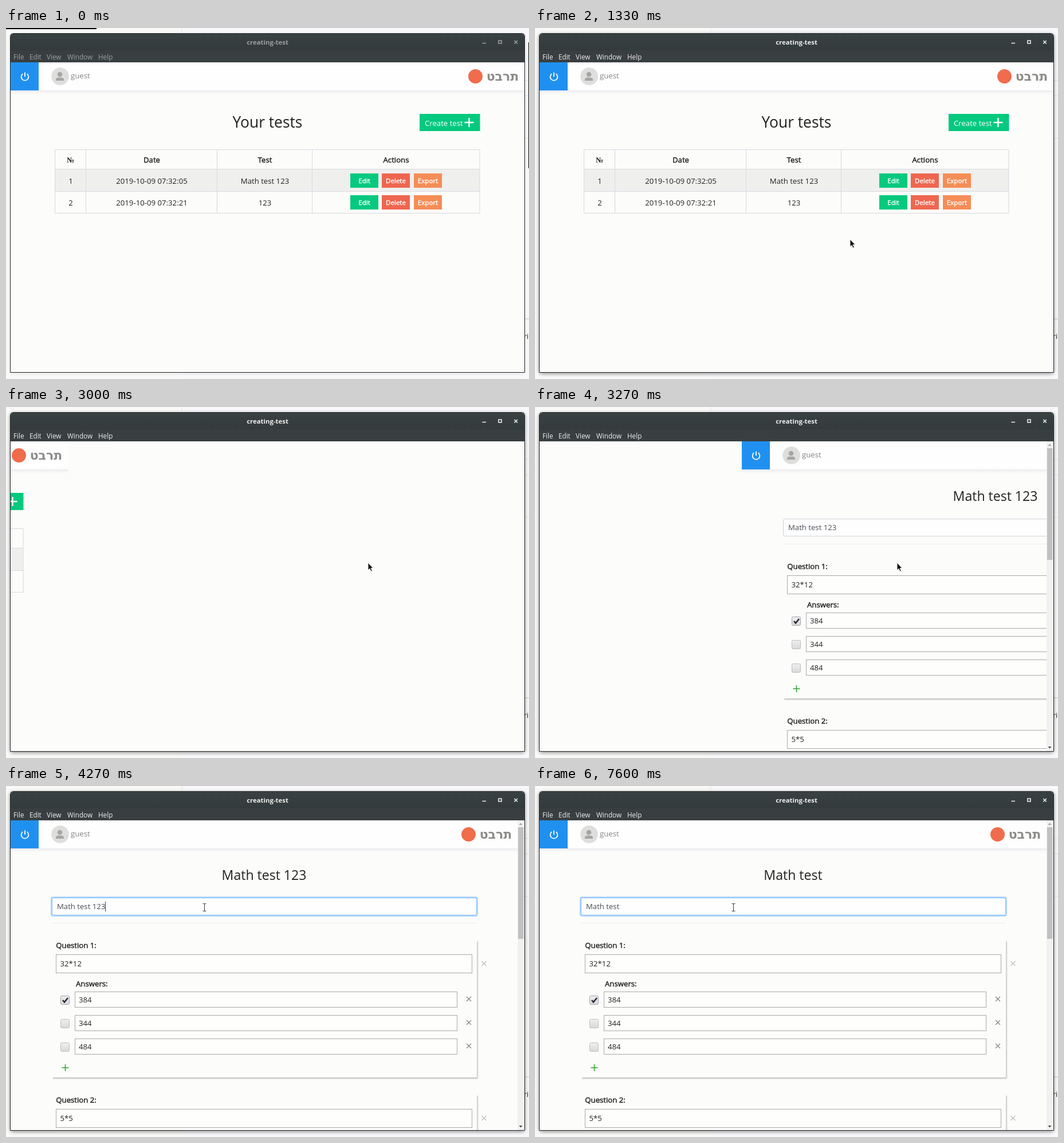
Write an HTML page that moves like this. It is 913 by 613 pixels and loops after 8 s.

```html
<!DOCTYPE html>
<html lang="en">
<head>
<meta charset="utf-8">
<title>creating-test</title>
<style>
  html, body { margin: 0; width: 100%; height: 100%; overflow: hidden; background: #f8f8fa; }
  svg { display: block; font: 13.2px "Open Sans", "Noto Sans", sans-serif; }
  text { fill: #222; white-space: pre; }
  .mid { text-anchor: middle; }
  .bold { stroke: #222; stroke-width: .45px; }
  .white, .button text { fill: #fff; }
  .button text { font-size: 11.55px; stroke: #fff; stroke-width: .4px; text-anchor: middle; }
  .chrome text { fill: #eee; font-size: 11.7px; }
  .chrome .title { font-size: 11.4px; font-weight: bold; text-anchor: middle; }
  .line { fill: none; stroke: #d9d9e2; }
  .field { fill: #fefefd; stroke: #a9a9a9; }
</style>
</head>
<body>
<svg width="913" height="613" viewBox="0 0 913 613">
  <defs>
    <linearGradient id="bar" x2="0" y2="1"><stop stop-color="#3a4142"/><stop offset="1" stop-color="#2f3637"/></linearGradient>
    <linearGradient id="box" x2="0" y2="1"><stop stop-color="#efefef"/><stop offset="1" stop-color="#d9d9d9"/></linearGradient>
    <linearGradient id="fade" x2="0" y2="1"><stop stop-color="#e9e9ee"/><stop offset="1" stop-color="#fcfcfa" stop-opacity="0"/></linearGradient>
    <filter id="blur" x="-5%" y="-5%" width="110%" height="110%"><feGaussianBlur stdDeviation="3"/></filter>
    <filter id="soft" x="-5%" y="-5%" width="110%" height="110%"><feGaussianBlur stdDeviation="1.3"/></filter>
    <clipPath id="view"><rect id="viewRect" x="8" y="60" width="897" height="541"/></clipPath>
    <clipPath id="avatar"><circle cx="94.5" cy="84.5" r="15.5"/></clipPath>
    <path id="cross" d="M-4-4 4 4M4-4-4 4"/>
    <g id="header">
      <rect x="8" y="60" width="897" height="49" fill="#fefefe"/>
      <rect x="8" y="109" width="897" height="9" fill="url(#fade)"/>
      <rect x="8" y="60" width="49" height="49" fill="#2090f0"/>
      <path d="M29.3 80a6.4 6.4 0 1 0 7.4 0M33 77.5V85" fill="none" stroke="#fff" stroke-width="1.8"/>
      <g clip-path="url(#avatar)">
        <circle cx="94.5" cy="84.5" r="15.5" fill="#dededc"/>
        <path d="M87 92v-2q0-3 4-3.5h6q4 .5 4 3.5v2z" fill="#a6a6a4"/>
        <circle cx="94" cy="81" r="4.3" fill="#a6a6a4"/>
      </g>
      <text x="113" y="88" style="fill:#858585">guest</text>
    </g>
    <g id="brand">
      <circle cx="819.5" cy="84.5" r="12.5" fill="#ef6c4c"/>
      <text class="mid" x="867" y="91.5" style="fill:#8b8b89;font:bold 22px 'DejaVu Sans',sans-serif">תרבט</text>
    </g>
  </defs>

  <rect width="306" height="613" fill="#f9f9f8"/>
  <path d="M306.5 0V10" stroke="#e6e6ea"/>
  <path d="M906 91.5h7M906 118.5h7M906 192.5h7" stroke="#e4e4e8"/>
  <path d="M906 508h7" stroke="#dcdce0" stroke-width="2"/>
  <path id="otherWindow" d="M0 0H158V2H0zM912 25h1V245h-1z"/>
  <rect id="shadow" x="7" y="11" width="899" height="593" rx="5" filter="url(#blur)"/>
  <text x="904" y="543" style="font-size:12.5px">rid</text>

  <path d="M7.5 601.5V15q0-5.5 5.5-5.5H900q5.5 0 5.5 5.5V601.5z" fill="#fcfcfa" stroke="#222727"/>
  <path d="M8 60V15q0-5 5-5H900q5 0 5 5V60z" fill="url(#bar)"/>
  <rect x="8" y="39" width="897" height="21" fill="#393f41"/>
  <g id="chrome" class="chrome">
    <text class="title" x="456.5" y="28.5">creating-test</text>
    <text x="13" y="54.5">File</text><text x="41" y="54.5">Edit</text><text x="71" y="54.5">View</text>
    <text x="107" y="54.5">Window</text><text x="161" y="54.5">Help</text>
    <path d="M831.5 26.5h6.5M860 22h5v5h-5zM887.3 22l5.5 5.5M892.8 22l-5.5 5.5" fill="none" stroke="#eee" stroke-width="1.6"/>
  </g>

  <g clip-path="url(#view)">
    <g id="listPage">
      <use href="#header"/><use href="#brand"/>
      <text class="mid" x="456.5" y="174" style="font-size:26.4px">Your tests</text>
      <rect x="722" y="150" width="105.5" height="30" fill="#04c97e"/>
      <text class="white" x="731" y="171">Create test</text>
      <path d="M800.5 165h16M808.5 157v16" stroke="#fff" stroke-width="2.4"/>
      <rect x="86" y="247" width="741" height="39" fill="#efefed"/>
      <path class="line" d="M85.5 212.5H827V323.5H85.5zM139.5 213V323M368.5 213V323M534.5 213V323M86 246.5H827M86 285.5H827"/>
      <text class="mid" x="113" y="234.5" style="font:bold 13.2px 'Liberation Serif',serif">№</text>
      <text class="mid bold" x="254.5" y="234.5">Date</text>
      <text class="mid bold" x="452" y="234.5">Test</text>
      <text class="mid bold" x="681" y="234.5">Actions</text>
      <g id="rows"></g>
    </g>
    <g id="editPage">
      <use href="#header"/><use href="#brand" x="-12"/>
      <text id="heading" class="mid" x="450.5" y="164" style="font-size:23.1px"></text>
      <rect id="glow" x="78" y="193" width="746" height="35" rx="4.5" fill="#b0d6fd"/>
      <rect id="nameField" x="80.5" y="195.5" width="741" height="30" rx="3" fill="#fefefe"/>
      <text id="name" x="88.9" y="215" style="fill:#495057"></text>
      <path id="caret" d="M0 202v17" stroke="#333"/>
      <path d="M80 239.5H822" stroke="#ececea"/>
      <g id="questions"></g>
    </g>
  </g>
  <g id="scrollbar">
    <rect x="893" y="60" width="12" height="541" fill="#f1f1f0"/>
    <rect x="894" y="72" width="9.5" height="195" fill="#c1c1c1"/>
    <path d="M895.5 68h6l-3-3.5z" fill="#a3a3a3"/><path d="M895.5 593h6l-3 3.5z" fill="#505050"/>
  </g>

  <g id="cursor" stroke="#fff" stroke-linejoin="round" fill="#111">
    <path id="arrow" d="M0 0V13l3-2.6 2.2 4.8 2.2-1-2.2-4.6H9z" stroke-width=".9"/>
    <path id="hand" d="M-1 0q1.3-1 2 .5l1 4 6 .8q1.7.5 1.5 2.5l-.8 5H.8L-3 8.5q-.3-1.6 1.3-1.2L0 8z" stroke-width=".9"/>
    <path id="beam" d="M-3-6.5h2.2l.8.7.8-.7H3M0-6V6M-3 6.5h2.2l.8-.7.8.7H3" fill="none" stroke="#444" stroke-width="1.1"/>
  </g>
</svg>
<script>
const LOOP = 8000, FPS = 15;
const $ = id => document.getElementById(id);
const set = (id, attrs) => { for (const key in attrs) $(id).setAttribute(key, attrs[key]); };
const show = (id, on) => { $(id).style.display = on ? '' : 'none'; };

const button = (x, y, label, color, id = '') => `<g class="button">
  <rect ${id} x="${x}" y="${y}" width="49" height="25" fill="${color}"/>
  <text x="${x + 24.5}" y="${y + 17}">${label}</text></g>`;

const row = (number, date, test, y) => `
  <text class="mid" x="113" y="${y}">${number}</text>
  <text class="mid" x="254.5" y="${y}">${date}</text>
  <text class="mid" x="452" y="${y}">${test}</text>
  ${button(601, y - 17.5, 'Edit', '#04c97e', `id="edit${number}"`)}
  ${button(656, y - 17.5, 'Delete', '#ef6650')}
  ${button(712, y - 17.5, 'Export', '#f58d57')}`;

const cross = (x, y, color, width) =>
  `<use href="#cross" x="${x}" y="${y}" stroke="${color}" stroke-width="${width}"/>`;

const answer = (value, checked, y) => `
  <rect x="95.5" y="${y + 7}" width="15" height="15" rx="2" fill="url(#box)" stroke="${checked ? '#a3a3ad' : '#bebebe'}"/>
  ${checked ? `<path d="M99 ${y + 14.5}l3 3.5 6-7.5" fill="none" stroke="#2b2838" stroke-width="2.6"/>` : ''}
  <rect class="field" x="120.5" y="${y}" width="667" height="27"/>
  <text x="127" y="${y + 18.5}">${value}</text>
  ${cross(808, y + 12.5, '#858585', 1.3)}`;

const question = (number, text, answers, y) => `
  <rect x="82" y="${y + 6}" width="741.5" height="240" fill="#bbb" filter="url(#soft)"/>
  <rect x="79" y="${y - 4}" width="743" height="248" fill="#fcfcfa"/>
  <text class="bold" x="87.3" y="${y + 18}">Question ${number}:</text>
  <rect class="field" x="87.5" y="${y + 29.5}" width="726" height="32"/>
  <text x="94.5" y="${y + 50}">${text}</text>
  ${cross(834.5, y + 45, '#bcbcc0', 1.2)}
  <text class="bold" x="122" y="${y + 84.5}">Answers:</text>
  ${answers.map((value, i) => answer(value, i === 0, y + 94.5 + 41 * i)).join('')}
  <path d="M97.5 ${y + 227}h12M103.5 ${y + 221}v12" stroke="#28a428" stroke-width="1.5"/>`;

$('rows').innerHTML = row(1, '2019-10-09 07:32:05', 'Math test 123', 271.5)
  + row(2, '2019-10-09 07:32:21', '123', 309.5);
$('questions').innerHTML = question(1, '32*12', [384, 344, 484], 265)
  + question(2, '5*5', [], 535);

const progress = (t, from, to) => Math.min(1, Math.max(0, (t - from) / (to - from)));
const easeOut = u => 1 - (1 - u) ** 2;
const smooth = u => u * u * (3 - 2 * u);

// Pointer path: time, x, y
const path = [
  [870, 760, 613], [1330, 550, 369], [1670, 538, 330], [2400, 632, 272],
  [3330, 632, 272], [3600, 405, 229], [4000, 346.5, 212]
];

function pointer(t) {
  const i = path.findIndex(point => point[0] > t);
  if (i < 0) return path[path.length - 1].slice(1);
  if (i === 0) return [-50, -50];
  const [t0, x0, y0] = path[i - 1], [t1, x1, y1] = path[i];
  const u = smooth(progress(t, t0, t1));
  return [x0 + (x1 - x0) * u, y0 + (y1 - y0) * u];
}

const typedName = t => t < 5070 ? 'Math test 123' : t < 5200 ? 'Math test 12'
  : t < 5730 ? 'Math test 1' : 'Math test ';

const caretSpans = [[4070, 4600], [5070, 5600], [5730, 6070], [6600, 7130]];

function draw(t) {
  const active = progress(t, 130, 330);
  set('chrome', { opacity: .55 + .45 * active });
  set('shadow', { opacity: .08 + .34 * active });
  set('otherWindow', { opacity: 1 - active });

  const editing = t >= 3100;
  show('listPage', !editing);
  show('editPage', editing);
  show('scrollbar', editing);
  set('viewRect', { width: editing ? 885 : 897 });
  const leave = Math.round(-897 * easeOut(progress(t, 2800, 3100)));
  const enter = Math.round(885 * (1 - easeOut(progress(t, 3100, 3561))));
  set('listPage', { transform: `translate(${leave})` });
  set('editPage', { transform: `translate(${enter})` });

  const name = typedName(t);
  $('name').textContent = name;
  $('heading').textContent = name.trim();
  const focus = progress(t, 4070, 4240);
  set('glow', { opacity: focus });
  set('nameField', { stroke: focus > .4 ? '#80bdff' : '#ced2da' });
  const caretOn = caretSpans.some(([from, to]) => t >= from && t < to);
  show('caret', caretOn);
  if (caretOn) set('caret', { transform: `translate(${Math.round(88.9 + $('name').getComputedTextLength()) + .5})` });

  const [x, y] = pointer(t);
  const inside = (left, top, right, bottom) => x > left && x < right && y > top && y < bottom;
  const onEdit = t < 2830 && inside(601, 254, 650, 279);
  const onName = editing && inside(80, 195, 822, 226);
  set('cursor', { transform: `translate(${x} ${y})` });
  set('edit1', { fill: onEdit ? '#06b06c' : '#04c97e' });
  show('hand', onEdit);
  show('beam', onName);
  show('arrow', !onEdit && !onName);
}

// The picture steps 15 times a second, on times rounded to 10 ms.
function tick(now) {
  const step = Math.floor((now % LOOP + 4) * FPS / 1000);
  draw(Math.round(step * 100 / FPS) * 10 % LOOP);
  requestAnimationFrame(tick);
}
draw(0);
requestAnimationFrame(tick);
</script>
</body>
</html>
```
